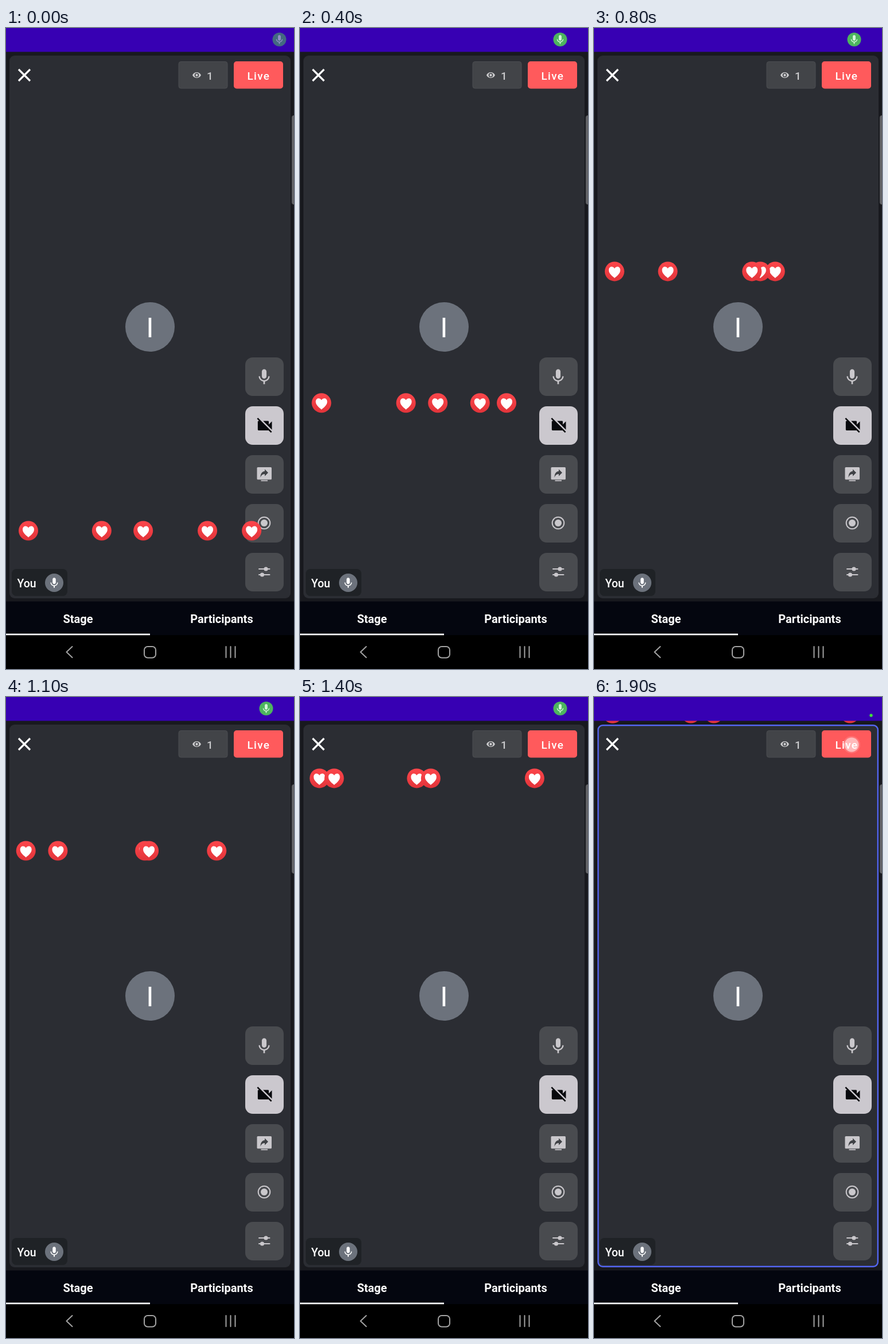
An HTML page for the animation above (2 s loop, 502 by 1115 pixels).

```html
<!DOCTYPE html>
<html lang="en">
<head>
<meta charset="utf-8">
<title>Live stage reactions</title>
<style>
  html, body { margin: 0; width: 100%; height: 100%; overflow: hidden; background: #000; }
  svg { display: block; width: 502px; height: 1115px; }
  text { font-family: Roboto, sans-serif; fill: #fff; }
  .line { fill: none; stroke-linecap: round; stroke-linejoin: round; }
</style>
</head>
<body>
<svg viewBox="0 0 502 1115" xmlns="http://www.w3.org/2000/svg">
  <defs>
    <linearGradient id="red" x2="0" y2="1">
      <stop offset="0" stop-color="#fc464b"/>
      <stop offset="1" stop-color="#e2343a"/>
    </linearGradient>
    <g id="heart">
      <circle r="17" fill="url(#red)"/>
      <path fill="#fff" d="M0 11.5C-4 8-10 3.8-10-2.2C-10-9-2.6-9.8 0-5C2.6-9.8 10-9 10-2.2C10 3.8 4 8 0 11.5Z"/>
    </g>
    <path id="mic" transform="translate(-12 -11.5)" d="M12 14c1.66 0 3-1.34 3-3V5c0-1.66-1.34-3-3-3S9 3.34 9 5v6c0 1.66 1.34 3 3 3zm5.3-3c0 3-2.54 5.1-5.3 5.1S6.7 14 6.7 11H5c0 3.41 2.72 6.23 6 6.72V21h2v-3.28c3.28-.48 6-3.3 6-6.72z"/>
    <rect id="button" x="417" width="67" height="67" rx="13"/>
  </defs>

  <rect width="502" height="1115" fill="#18191e"/>
  <rect x="6" y="48" width="490" height="944" rx="9" fill="#2b2d33"/>
  <rect id="speaking" x="7.2" y="49.2" width="487.6" height="941.6" rx="8" fill="none" stroke="#5365f0" stroke-width="2.4"/>
  <rect x="498" y="152" width="10" height="155" rx="4" fill="#606165"/>

  <path class="line" d="M22 72L42 92M42 72L22 92" stroke="#fff" stroke-width="3.2" style="stroke-linecap:butt"/>
  <rect x="301" y="58.500" width="85" height="46.500" rx="4" fill="#424448" stroke="#4b4d51"/>
  <path fill="#cbcbcd" fill-rule="evenodd" d="M325 82C328 75.300 337 75.300 340 82C337 88.500 328 88.500 325 82ZM328.700 82a3.800 3.800 0 1 0 7.600 0a3.800 3.800 0 1 0-7.600 0Z"/>
  <circle cx="332.500" cy="82" r="2.200" fill="#cbcbcd"/>
  <text x="350" y="90" font-size="19" font-weight="500" style="fill:#cbcbcd">1</text>
  <rect x="397" y="58" width="86" height="47.500" rx="5" fill="#ff5a5c"/>
  <text x="420.500" y="90" font-size="19" font-weight="500" letter-spacing="1.3">Live</text>

  <circle cx="251" cy="520" r="43" fill="#6c727c"/>
  <text x="251" y="538" font-size="49" text-anchor="middle">I</text>

  <g fill="#494b4f">
    <use href="#button" y="573"/>
    <use href="#button" y="658" fill="#cbc8ce"/>
    <use href="#button" y="743"/>
    <use href="#button" y="828"/>
    <use href="#button" y="913"/>
  </g>
  <g fill="#cac8cc">
    <use href="#mic" transform="translate(450 606.500) scale(1.36)"/>
    <path fill="#08090d" transform="translate(450.500 691) scale(1.37) translate(-11.500 -11.500)" d="M21 6.500l-4 4V7c0-.55-.45-1-1-1H9.820L21 17.180V6.500zM3.270 2L2 3.270 4.730 6H4c-.55 0-1 .45-1 1v10c0 .55.45 1 1 1h12c.21 0 .39-.08.54-.18L19.730 21 21 19.730z"/>
    <rect x="437.500" y="764" width="25.500" height="21.500" rx="1.500"/>
    <rect x="444.500" y="786.500" width="11.500" height="1.800"/>
    <path fill="#404246" d="M451 767.500L457 773.500L451 779.500V776C447 776 445 778 443.500 782C443.500 775.500 446 771.500 451 771Z"/>
    <circle cx="450" cy="861" r="10.300" fill="none" stroke="#cac8cc" stroke-width="2"/>
    <circle cx="450" cy="861" r="6"/>
    <path class="line" d="M441 941H459.500M441 951H459.500" stroke="#cac8cc" stroke-width="2"/>
    <circle cx="453" cy="941" r="3.600"/>
    <circle cx="446.500" cy="951" r="3.600"/>
  </g>

  <rect x="10" y="941" width="97" height="47" rx="8" fill="#1f2226"/>
  <text x="19.500" y="972.500" font-size="19.500" font-weight="500">You</text>
  <circle cx="84" cy="965" r="16" fill="#6c727c"/>
  <use href="#mic" fill="#fff" transform="translate(84 965) scale(.93)"/>

  <rect y="997.500" width="502" height="59" fill="#04060f"/>
  <g font-size="20" font-weight="700" text-anchor="middle">
    <text x="125.500" y="1035">Stage</text>
    <text x="376" y="1035">Participants</text>
  </g>
  <rect y="1056" width="502" height="59"/>
  <rect y="1053.500" width="251" height="2.700" fill="#fff"/>
  <g class="line" stroke="#a3a3a3" stroke-width="2">
    <path d="M115.500 1076L105.500 1085.500L115.500 1095"/>
    <rect x="241" y="1076" width="20" height="19.500" rx="6"/>
    <path d="M383.500 1076V1095M391.500 1076V1095M399.500 1076V1095"/>
  </g>

  <g id="hearts"></g>
  <g id="touch">
    <circle cx="449" cy="83" r="15" fill="#fff" opacity=".15"/>
    <circle cx="449" cy="83" r="12.500" fill="#fff" opacity=".5"/>
  </g>

  <rect width="502" height="41.500" fill="#3700b3"/>
  <g id="micBadge">
    <circle r="12" fill="#4db55e"/>
    <use href="#mic" fill="#d5f5da" transform="scale(.82)"/>
  </g>
  <circle id="micDot" cx="483" cy="32" r="2.700" fill="#3fe03a"/>
</svg>
<script>
  const LOOP = 2000, STEP = 100;
  const TOP = 29, BOTTOM = 874;
  // Start and end x of each heart, back to front.
  const PATHS = [[167, 446], [428, 169], [351, 209], [39, 33], [239, 32]];

  const byId = id => document.getElementById(id);
  const show = (id, visible) => byId(id).setAttribute("display", visible ? "inline" : "none");

  const hearts = PATHS.map(() => {
    const heart = document.createElementNS("http://www.w3.org/2000/svg", "use");
    heart.setAttribute("href", "#heart");
    return byId("hearts").appendChild(heart);
  });

  // Accelerate-decelerate rise over three seconds, with a small early lead.
  const heartY = t =>
    568.5 - 546 * Math.sin(Math.PI * (t - 542) / 3000) + 12.5 * Math.exp(-t / 270);

  function draw(t) {
    const y = heartY(t), progress = (BOTTOM - y) / (BOTTOM - TOP);
    PATHS.forEach(([from, to], i) => {
      const x = from + (to - from) * progress;
      hearts[i].setAttribute("transform", `translate(${x} ${y})`);
    });

    const entering = Math.max(0, 1 - t / 300);
    const badge = byId("micBadge");
    badge.setAttribute("transform", `translate(${453.5 + 23 * entering ** 2} 20)`);
    badge.setAttribute("opacity", 1 - 0.42 * entering);
    show("micBadge", t < 1800);
    show("micDot", t >= 1800);
    show("speaking", t >= 1900);
    show("touch", t >= 1900);
  }

  const start = performance.now();
  function tick() {
    const t = (performance.now() - start) % LOOP;
    draw(Math.floor(t / STEP) * STEP);
    requestAnimationFrame(tick);
  }
  tick();
</script>
</body>
</html>
```
